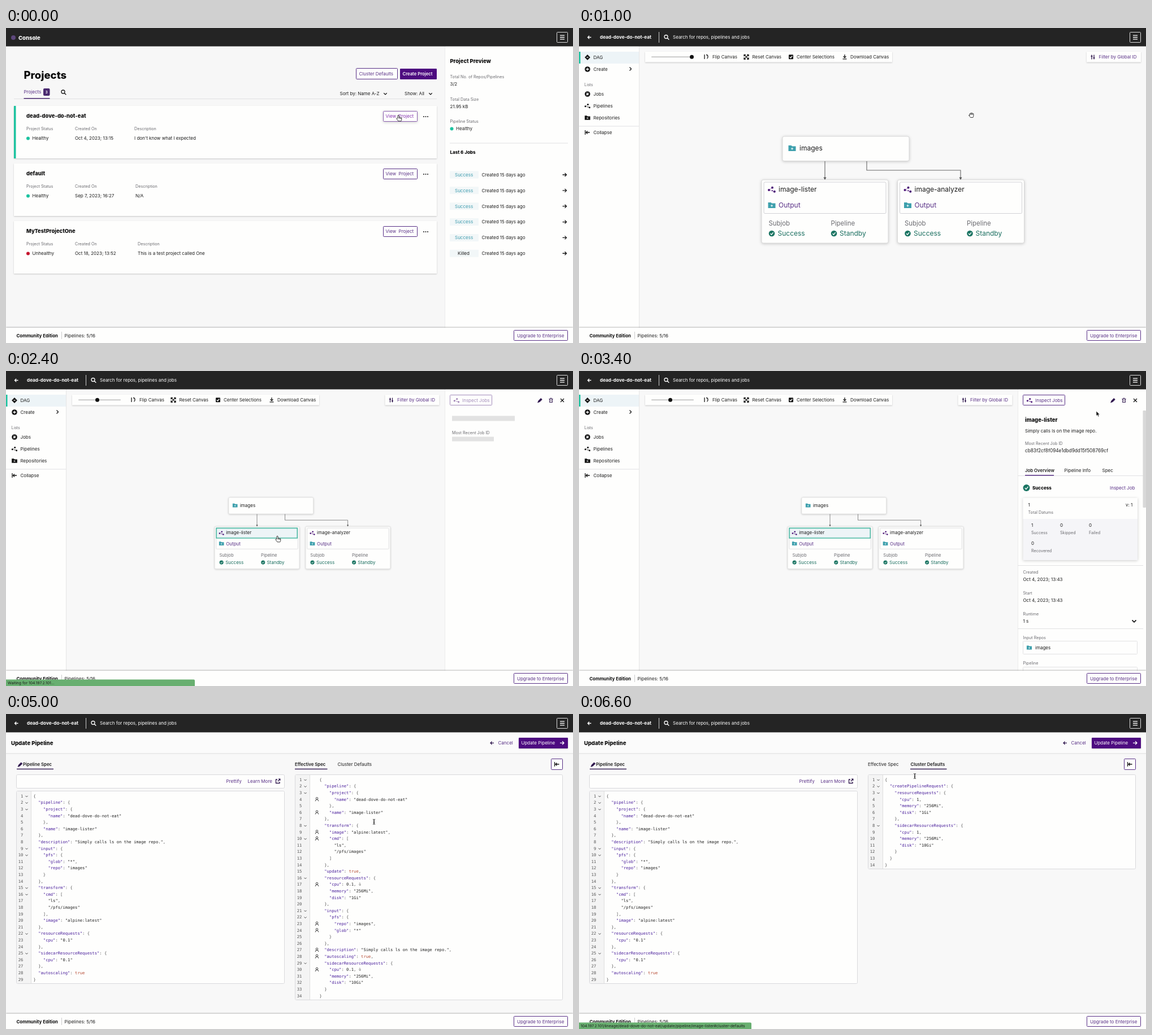
An HTML page for the animation above (6800 ms loop, 1003 by 558 pixels).

```html
<!DOCTYPE html>
<html lang="en">
<head>
<meta charset="utf-8">
<title>Console</title>
<style>
html, body { margin: 0; width: 100%; height: 100%; overflow: hidden; background: #f7f7f7; }
svg { display: block; width: 100vw; height: 100vh; }
text { font-family: Inter, "Open Sans", sans-serif; fill: #1d1d1d; white-space: pre; }
.head { font-weight: 800; fill: #0c0c0c; }
.bold { font-weight: 700; fill: #0c0c0c; }
.semi { font-weight: 600; }
.label { fill: #6b6b70; }
.purple { fill: #582f86; }
.violet { fill: #8433b0; }
.white { fill: #fff; }
.green { fill: #1b6f60; }
.teal { fill: #3f9cae; }
.code { font-family: "DejaVu Sans Mono", monospace; fill: #555; }
.code .key { fill: #4a1f9c; }
.code .str { fill: #222; }
.code .bool { fill: #b54a32; }
.code .old { text-decoration: line-through; fill: #888; }
.line { fill: none; stroke: #151515; stroke-width: 1.3; }
.shadow { filter: drop-shadow(0 1px 1px #0003); }
.raised { filter: drop-shadow(0 1px 2.5px #0003); }
</style>
</head>
<body>
<script>
const LOOP = 6800;
const PURPLE = '#582f86', GREEN = '#1cc3a0', PAPER = '#fefefd', RULE = '#e1e1e3';
let rules = '', count = 0;

// Timing: every track holds its value until the next key.
const at = ms => Math.max(0, (ms - 1) / LOOP * 100).toFixed(3) + '%';
function track(keys, body) {
  const name = 'track' + count++;
  rules += `@keyframes ${name}{${keys.map(([ms, css]) => `${at(ms)}{${css}}`).join('')}}
    .${name}{animation:${name} ${LOOP}ms step-end infinite}`;
  return `<g class="${name}">${body}</g>`;
}
function during(spans, body) {
  const keys = [[0, 'opacity:0']];
  for (const [from, to] of spans) {
    keys.push([from, 'opacity:1']);
    if (to < LOOP) keys.push([to, 'opacity:0']);
  }
  return track(keys, body);
}

// Drawing: text is placed by the middle of its capitals.
const text = (x, y, s, cls = '', size = 8) =>
  `<text x="${x}" y="${(y + size * .36).toFixed(2)}" font-size="${size}" class="${cls}">${s}</text>`;
const label = (x, y, s) => text(x, y, s, 'label', 7.2);
const rect = (x, y, w, h, fill, more = '') =>
  `<rect x="${x}" y="${y}" width="${w}" height="${h}" fill="${fill}" ${more}/>`;
// Outlined box: whole-pixel outer bounds keep the border crisp.
const box = (x, y, w, h, color = RULE, fill = PAPER, rx = 1, more = '') =>
  rect(x + .5, y + .5, w - 1, h - 1, fill, `stroke="${color}" rx="${rx}" ${more}`);
const dot = (x, y, r, fill) => `<circle cx="${x}" cy="${y}" r="${r}" fill="${fill}"/>`;
const icon = (x, y, d, color = '#151515', more = '') =>
  `<path transform="translate(${x} ${y})" d="${d}" class="line" style="stroke:${color};${more}"/>`;
const hline = (x, y, w, color = RULE, h = 1) => rect(x, y, w, h, color);

const RIGHT = 'M-3.5 0h7M.5-3l3 3-3 3', LEFT = 'M3 0h-6M-.3-2.7l-2.7 2.7 2.7 2.7';
const DOWN = 'M-2.7-1.3l2.7 2.7 2.7-2.7', CROSS = 'M-3-3l6 6M3-3l-6 6';
const TOLEFT = 'M-4-4v8M4 0h-6M0-2.5l-2.5 2.5 2.5 2.5';
const search = (x, y, c) => icon(x, y, 'M2-1a3 3 0 1 0-6 0a3 3 0 1 0 6 0M1.3 1.3l3 3', c);
const pencil = (x, y) => icon(x, y, 'M-3.3 3.3l1-2.5 4-4 1.6 1.6-4 4z', '#31194f', 'fill:#31194f');
const check = (x, y, r) => dot(x, y, r, '#1b7563') +
  icon(x, y, `M${-r * .45} 0l${r * .35} ${r * .4} ${r * .6} ${-r * .75}`, '#fff');
const folder = (x, y, s = 1, c = '#3ea0ad') => `<g transform="translate(${x} ${y}) scale(${s})">
  <path d="M-6.5-5h5l1.5 1.5h6.5v8.5h-13z" fill="${c}"/><path d="M-2 .8h4M0-1.2v4" stroke="#fff"/></g>`;
const nodes = (x, y, s = 1, c = '#4b1477') => `<g transform="translate(${x} ${y}) scale(${s})">
  <path d="M-5 1L1-3M-5 1L5 4" stroke="${c}" stroke-width=".8" opacity=".6"/>
  ${dot(-5, 1, 2, c)}${dot(1, -3.3, 2, c)}${dot(4.8, 3.8, 2, c)}${dot(1, 2, 1, c)}</g>`;

function header() {
  return rect(0, 0, 1003, 32.5, '#242424') + box(974, 7, 20, 19, '#ddd', 'none') +
    icon(984, 16.5, 'M-4-3.3h8M-4 0h8M-4 3.3h8', '#fff') +
    during([[0, 400]], dot(13, 17, 4, '#5d477c') + text(22, 17.5, 'Console', 'head white', 9.5)) +
    during([[400, LOOP]], icon(18.5, 16.5, LEFT, '#fff') +
      text(37, 16.5, 'dead-dove-do-not-eat', 'bold white', 8.2) + rect(141, 7, 1, 19, '#ccc') +
      search(155, 16.5, '#fff') + text(166, 16.5, 'Search for repos, pipelines and jobs', 'white'));
}

function footer() {
  return rect(0, 531, 1003, 28, PAPER, 'style="filter:drop-shadow(0 -1px 1px #0004)"') +
    text(18.5, 545, 'Community Edition', 'bold', 7.9) + rect(98, 538, 1, 13, '#ccc') +
    text(103.5, 545, 'Pipelines: 5/16') + box(898, 535, 96, 19, PURPLE) +
    text(904, 545, 'Upgrade to Enterprise', 'purple');
}

const viewButton = (y, hovered) =>
  box(667, y, 61, 19, hovered ? '#8a5fae' : PURPLE, PAPER, 1, hovered ? 'class="raised"' : '') +
  text(671.5, y + 9.5, 'View  Project', hovered ? 'violet' : 'purple');

function project(y, name, health, color, created, descX, descText, hovered = false) {
  return rect(14, y, 748, 93, PAPER, 'class="shadow"') + text(36, y + 18, name, 'head', 9.4) +
    label(36, y + 40, 'Project Status') + dot(39, y + 57.5, 3, color) + text(46.5, y + 57.5, health) +
    label(122, y + 40, 'Created On') + text(122, y + 57.5, created) +
    label(descX, y + 40, 'Description') + text(descX, y + 57.5, descText) + viewButton(y + 9, hovered) +
    [739, 742.5, 746].map(x => dot(x, y + 19, 1, '#151515')).join('');
}

function projectsPage() {
  const jobs = [0, 1, 2, 3, 4, 5].map(i => {
    const y = 260 + i * 27.85, killed = i == 5;
    return rect(785, y - 6.5, 51, 13, '#f2f7f8', 'rx="1"') +
      text(killed ? 799 : 794, y, killed ? 'Killed' : 'Success', killed ? '' : 'teal') +
      text(841.5, y, 'Created 15 days ago') + icon(988, y, RIGHT);
  }).join('');
  return rect(0, 32, 1003, 500, '#f7f7f7') + text(31.5, 83.2, 'Projects', 'head', 18.5) +
    box(619, 71, 74, 20, PURPLE) + text(624.5, 81.5, 'Cluster Defaults', 'purple') +
    rect(697, 72, 65, 19, '#4d0b80', 'rx="1"') + text(701.5, 81.5, 'Create Project', 'white semi', 7.7) +
    text(31.5, 113.5, 'Projects', 'purple') + rect(66, 107, 11.5, 13, '#4a2a70', 'rx="2"') +
    text(69.8, 113.7, '3', 'white bold', 6) + search(102, 114, '#151515') +
    text(590.5, 116, 'Sort by: Name A-Z') + icon(671, 116.5, DOWN) +
    text(705, 116, 'Show: All') + icon(751, 116.5, DOWN) +
    hline(14, 125, 748) + hline(31.5, 124, 46, '#4a2a70', 1.5) +
    project(138, 'dead-dove-do-not-eat', 'Healthy', GREEN, 'Oct 4, 2023; 13:15', 227, "I don't know what I expected", true) +
    rect(14, 138, 3.5, 93, GREEN) +
    project(240, 'default', 'Healthy', GREEN, 'Sep 7, 2023; 16:27', 229, 'N/A') +
    project(342, 'MyTestProjectOne', 'Unhealthy', '#c5162e', 'Oct 18, 2023; 13:52', 233, 'This is a test project called One') +
    rect(776, 32, 227, 499, PAPER) + rect(776, 32, 1, 499, '#ececec') +
    text(785.5, 58.5, 'Project Preview', 'head', 9.4) +
    label(785.5, 86.5, 'Total No. of Repos/Pipelines') + text(785.5, 99.5, '3/2') +
    label(785.5, 126, 'Total Data Size') + text(785.5, 139, '21.95 kB') +
    label(785.5, 165, 'Pipeline Status') + dot(788.5, 178.5, 3, GREEN) + text(796, 178.5, 'Healthy') +
    hline(785, 203.5, 209) + text(785.5, 220.5, 'Last 6 Jobs', 'head', 8) + jobs;
}

function pipelineNode(x, name, highlight = '') {
  return rect(x, 269, 224, 112, PAPER, 'rx="3" stroke="#dadada" class="raised"') +
    box(x + 3.5, 272.5, 217, 56.5, '#d2d2d6', PAPER, 2) + highlight +
    nodes(x + 18, 286) + text(x + 30, 285.5, name, '', 12) +
    folder(x + 18, 314) + text(x + 30, 314, 'Output', 'purple', 12) +
    text(x + 12.5, 345.5, 'Subjob', 'label', 11.4) + text(x + 122.5, 345.5, 'Pipeline', 'label', 11.4) +
    check(x + 18, 364, 5.3) + text(x + 28.5, 364, 'Success', 'green', 12) +
    check(x + 128, 364, 5.3) + text(x + 138, 364, 'Standby', 'green', 12);
}

function graph() {
  const selected = during([[2200, 3800]],
    rect(327.5, 273, 214, 26.5, '#edf4f7', 'stroke="#2bae94" stroke-width="2"'));
  const head = x => `<path d="M${x - 2.5} 264.5h5l-2.5 4.5z" fill="#555"/>`;
  return track([
    [0, 'transform:none'],
    [2200, 'transform:translate(76px,48px) scale(.835)'],
    [2400, 'transform:translate(153px,95.6px) scale(.669)']
  ], rect(360, 192, 224, 43.5, PAPER, 'rx="3" stroke="#dadada" class="raised"') +
    folder(377, 213) + text(390, 212.5, 'images', '', 12) +
    pipelineNode(323, 'image-lister', selected) + pipelineNode(563.5, 'image-analyzer') +
    '<path d="M435 236v30M509 236v16h166v14" fill="none" stroke="#666" stroke-width="1.1"/>' +
    head(435) + head(675));
}

function sidebar() {
  const black = '#151515';
  return rect(0, 32, 106.5, 499, PAPER) + rect(106, 32, 1, 499, '#e6e6e6') +
    rect(0, 42, 106, 21, '#edf4f7') + rect(0, 42, 2.5, 21, GREEN) +
    icon(15, 52, 'M0-4l4 4-4 4-4-4z', black, 'fill:#151515') + icon(15, 52, 'M-1.5 0h3', '#fff') +
    text(25.5, 52, 'DAG') +
    dot(15, 73, 4.8, black) + icon(15, 73, 'M-2.6 0h5.2M0-2.6v5.2', '#fff') +
    text(25.5, 73, 'Create') + icon(91, 72.5, 'M-1.5-3l3 3-3 3') +
    text(9.5, 100, 'Lists', 'label', 7) +
    dot(15, 117, 4.8, black) + icon(15, 117, 'M-2 2l4-4M-1-2.5v3.5h3', '#fff') + text(25.5, 117, 'Jobs') +
    nodes(15, 138, .75, black) + text(25.5, 138, 'Pipelines') +
    folder(15, 159, .75, black) + text(25.5, 159, 'Repositories') +
    hline(0, 173.5, 106) + icon(15, 185, TOLEFT) + text(25.5, 185.5, 'Collapse');
}

function toolbar() {
  const knob = track([[0, 'transform:none'], [2200, 'transform:translateX(-19px)'], [2400, 'transform:translateX(-38px)']],
    dot(199.5, 51.3, 3.5, '#111'));
  const filter = track([[0, 'transform:none'], [2200, 'transform:translateX(-227.5px)']],
    rect(898, 42, 96, 18.5, PAPER, 'class="shadow"') +
    icon(909, 51.5, 'M-2-4v8M2-4v8M-3.5-1.5h3M.5 1.5h3', '#31194f') + text(919.5, 51.3, 'Filter by Global ID', 'purple'));
  return rect(117, 42, 437, 18.5, PAPER, 'class="shadow"') + rect(128, 50.3, 75, 2, '#c9c9c9', 'rx="1"') + knob +
    icon(225, 51, 'M-3-4v8M0-3.5q3 0 3 3.5t-3 3.5', '#151515', 'stroke-dasharray:9 2') + text(236, 51.3, 'Flip Canvas') +
    icon(296, 51.3, 'M-4-1v-3h3M1-4h3v3M4 1v3h-3M-1 4h-3v-3M-4-4l8 8M4-4l-8 8') + text(306.5, 51.3, 'Reset Canvas') +
    rect(371, 47.3, 8, 8, '#151515', 'rx="1"') + icon(375, 51.3, 'M-2.3 0l1.7 1.7 3-3.5', '#fff') + text(385, 51.3, 'Center Selections') +
    icon(470, 51, 'M0-4v5.5M-2.4-.8l2.4 2.4 2.4-2.4M-3.5 3.8h7') + text(480, 51.3, 'Download Canvas') + filter;
}

function panel() {
  const stat = (x, y, n, name) => text(x, y, n) + label(x, y + 13, name);
  const inspect = box(785, 42, 75, 19, PURPLE) + nodes(797, 52, .75) + text(807, 52, 'Inspect Jobs', 'purple');
  const loading = `<g opacity=".55">${inspect}</g>` + rect(789, 79.5, 111, 9, '#e2e2e2') + rect(789, 116.5, 74, 8, '#e2e2e2') +
    label(789, 109, 'Most Recent Job ID');
  const loaded = inspect + text(789, 87, 'image-lister', 'head', 9.5) +
    text(789, 106, 'Simply calls ls on the image repo.') + label(789, 128, 'Most Recent Job ID') +
    text(789, 141.5, 'cb83f2cf8f094e1dbd9dd15f508769cf', '', 8.25) +
    text(789, 176, 'Job Overview', 'semi', 7.8) + text(858.5, 176, 'Pipeline Info') + text(925.5, 176, 'Spec') +
    hline(776, 185, 222) + hline(789, 184, 51, PURPLE, 1.5) +
    check(791.5, 207, 6) + text(802, 207, 'Success', 'head', 8) + text(939, 207, 'Inspect Job', 'purple') +
    rect(785.5, 225, 202.5, 110, '#f5f5f8', 'class="raised"') + rect(785.5, 225, 202.5, 37, PAPER) +
    stat(794.5, 237, '1', 'Total Datums') + text(967, 237, 'v: 1') +
    stat(800, 273, '1', 'Success') + stat(851, 273, '0', 'Skipped') + stat(902, 273, '0', 'Failed') +
    stat(800, 305.5, '0', 'Recovered') + hline(776, 344, 222) +
    label(785.5, 356, 'Created') + text(785.5, 369.5, 'Oct 4, 2023; 13:43') +
    label(785.5, 393.5, 'Start') + text(785.5, 406.5, 'Oct 4, 2023; 13:43') +
    label(785.5, 430.5, 'Runtime') + text(785.5, 443.5, '1 s') +
    icon(982, 443, 'M-3.5-1.7l3.5 3.5 3.5-3.5', '#151515', 'stroke-width:1.8') +
    hline(776, 456, 222) + label(785.5, 472, 'Input Repos') + box(785, 478, 203, 24) +
    folder(796.5, 490, .7) + text(807, 490, 'images') + label(785.5, 517.5, 'Pipeline') + box(785, 524, 203, 23) +
    rect(997.5, 70, 5.5, 172, '#d8d8d8', 'rx="1"');
  return rect(776, 32, 227, 499, PAPER) + rect(776, 32, 1, 499, '#ececec') +
    pencil(944.5, 52) + icon(964, 52, 'M-3.5-2.5h7M-1.2-4h2.4M-2.5-2.5v6h5v-6M0-1v3', '#31194f', 'stroke-width:1') + icon(984, 52, CROSS) +
    during([[2200, 2600]], loading) + during([[2600, 3800]], loaded);
}

// Editor: gutter, fold marks and coloured JSON.
const STEP = 11.6, EDGE = '#d9d9dc';
function editor(x, y, w, codeX, data, { authored = [], replaced = [] } = {}) {
  const lines = JSON.stringify(data, null, 2).split('\n');
  const paint = s => s.replace(/("[^"]*")(:?)|\b(true)\b|([\d.]+)/g, (m, str, colon, bool) =>
    bool ? `<tspan class="bool">${m}</tspan>`
      : colon ? `<tspan class="key">${str}</tspan>:` : `<tspan class="str">${m}</tspan>`);
  const h = Math.round(lines.length * STEP + 6);
  return box(x, y, w, h, EDGE, PAPER, 2) + rect(x + 1, y + 1, 26, h - 2, '#f4f4f4') + rect(x + 26, y + 1, 1, h - 2, '#dedede') +
    lines.map((s, i) => {
      const n = i + 1, cy = y + 9.2 + i * STEP;
      const old = replaced.includes(n) ? ' <tspan class="old">1</tspan>' : '';
      return text(x + (n < 10 ? 8 : 3.7), cy, n, 'code', 7.2) + text(codeX, cy, paint(s) + old, 'code', 7.2) +
        (/[{[]$/.test(s) ? icon(x + 18.5, cy + .7, 'M-2-1l2 2 2-2', '#444', 'stroke-width:1') : '') +
        (authored.includes(n) ? icon(x + 39, cy, 'M-2.8 3.5q0-3 2.8-3t2.8 3M1.8-1.5a1.8 1.8 0 1 0-3.6 0a1.8 1.8 0 1 0 3.6 0', '#333', 'stroke-width:.9') : '');
    }).join('');
}

const about = 'Simply calls ls on the image repo.';
const pipeline = { project: { name: 'dead-dove-do-not-eat' }, name: 'image-lister' };
const cmd = ['ls', '/pfs/images'];
const limits = (cpu, disk) => ({ cpu, memory: '256Mi', disk });
const pipelineSpec = {
  pipeline,
  description: about,
  input: { pfs: { glob: '*', repo: 'images' } },
  transform: { cmd, image: 'alpine:latest' },
  resourceRequests: { cpu: '0.1' },
  sidecarResourceRequests: { cpu: '0.1' },
  autoscaling: true
};
const effectiveSpec = {
  pipeline,
  transform: { image: 'alpine:latest', cmd },
  update: true,
  resourceRequests: limits(0.1, '1Gi'),
  input: { pfs: { repo: 'images', glob: '*' } },
  description: about,
  autoscaling: true,
  sidecarResourceRequests: limits(0.1, '10Gi')
};
const clusterDefaults = {
  createPipelineRequest: { resourceRequests: limits(1, '1Gi'), sidecarResourceRequests: limits(1, '10Gi') }
};

function updatePage() {
  const tabs = first => text(511, 89, 'Effective Spec', first ? 'semi' : '', first ? 7.8 : 8) +
    text(586.5, 89, 'Cluster Defaults', first ? '' : 'semi', first ? 8 : 7.8) +
    hline(first ? 511 : 586, 96.8, first ? 57.5 : 64.5, '#31194f', 1.4);
  const button = fill => rect(907, 42, 87, 19, fill, 'rx="1" class="shadow"');
  return rect(0, 32, 1003, 499, '#f8f8f8') + rect(0, 32, 1003, 37.5, '#fbfbfb') + hline(0, 69.5, 1003, '#dedede') +
    text(9, 51.3, 'Update Pipeline', 'head', 9.6) +
    icon(860, 51.3, LEFT, '#31194f') + text(870.5, 51.3, 'Cancel', 'purple') +
    button('#4d0b80') + during([[3800, 4400]], button('#8c12c1')) +
    text(911.5, 51.3, 'Update Pipeline', 'white') + icon(983.5, 51.3, RIGHT, '#fff') +
    pencil(25, 89.5) + text(30, 89, 'Pipeline Spec', 'semi', 7.8) + hline(19, 96.8, 65, '#31194f', 1.4) +
    box(964, 79, 21, 20, PURPLE) + icon(974.5, 89, TOLEFT) +
    box(18, 107, 475, 25, EDGE, PAPER, 2) + text(389.5, 119.5, 'Prettify', 'purple') + text(427.5, 119.5, 'Learn More', 'purple') +
    icon(481, 119, 'M-1-3h-2.5v6.5h6.5v-2.5M1-3.8h2.8v2.8M3.8-3.8l-4 4', '#31194f') +
    during([[3800, 6200]], tabs(true)) + during([[6200, LOOP]], tabs(false)) +
    during([[3800, 4400]], box(18, 136, 475, 95, EDGE, PAPER, 2) +
      [238, 255.5, 273].map(x => dot(x, 183.5, 3, '#d3d3d3')).join('') +
      box(511, 107, 474, 18, EDGE, PAPER, 2) + rect(512, 108, 24, 16, '#f4f4f4') +
      rect(535, 108, 1, 16, '#dedede') + text(517, 116, '1', 'code', 7.2)) +
    during([[4400, LOOP]], editor(18, 136, 475, 48.5, pipelineSpec)) +
    during([[4400, 6200]], editor(511, 107, 474, 554.5, effectiveSpec,
      { authored: [4, 6, 9, 10, 17, 23, 24, 27, 28, 30], replaced: [17, 30] })) +
    during([[6200, LOOP]], editor(511, 107, 474, 541, clusterDefaults));
}

function statusBar() {
  const bar = (w, s) => rect(-2, 546.5, w + 2, 14, '#68af70', 'rx="2"') + text(3, 553, s, '', 6.85);
  return during([[200, 600], [2200, 2600], [3800, 4400]], bar(334, 'Waiting for 104.197.2.101...')) +
    during([[5600, LOOP]], bar(305, '104.197.2.101/lineage/dead-dove-do-not-eat/update/pipeline/image-lister#cluster-defaults'));
}

// Pointer: stops are [ms, x, y]; it advances once every 200 ms.
function pointer() {
  const stops = [[0, 694, 154], [1200, 694, 154], [2000, 480, 292], [2600, 480, 292], [3400, 915, 71], [3600, 944, 52],
    [4200, 944, 52], [5000, 651, 191], [5600, 630, 88], [6400, 630, 88], [6600, 594, 110], [LOOP, 594, 110]];
  const keys = [];
  for (let ms = 0; ms < LOOP; ms += 200) {
    const i = stops.findIndex(s => s[0] > ms);
    const [a, b] = [stops[i - 1], stops[i]];
    const p = (ms - a[0]) / (b[0] - a[0]), ease = p * p * (3 - 2 * p);
    const [x, y] = [1, 2].map(k => (a[k] + (b[k] - a[k]) * ease).toFixed(1));
    keys.push([ms, `transform:translate(${x}px,${y}px)`]);
  }
  const shape = d => `<path d="${d}" fill="#fff" stroke="#111" stroke-width=".8" stroke-linejoin="round"/>`;
  const hand = shape('M-1.1 6v-5q1.1-2 2.2 0v3.4q1-.8 1.7.2 1-.6 1.6.3 1.4-.4 1.4 1v2q0 1.5-1 3h-4.8l-3.2-4.2q0-1.8 2.1-.7zM1.1 4.4v2M2.8 4.8v1.8M4.4 5.1v1.7');
  const grab = shape('M-2.8 1v-3.2q.9-1.4 1.8-.4.2-1.6 1.6-.6 1.2-.8 1.7.6 1.6-.3 1.6 1.2v2.4q0 1.6-1 3.5h-4.4l-3-3.8q0-1.4 1.7.3zM-1-2.6v2.4M.6-3.2v3M2.3-2.6v2.4');
  const arrow = '<path d="M0 0v8.6l2-1.8 1.5 3.2 1.5-.7-1.5-3h2.7z" fill="#111" stroke="#fff" stroke-width=".6"/>';
  const beam = '<path d="M-2-4.5q2 0 2 1.2v6.6q0 1.2-2 1.2M2-4.5q-2 0-2 1.2v6.6q0 1.2 2 1.2M-1 1.2h2" fill="none" stroke="#222" stroke-width=".9"/>';
  return track(keys,
    during([[0, 400], [1800, 2800], [3600, 4400], [5600, 6600]], hand) + during([[400, 1800], [2800, 3200]], grab) +
    during([[3200, 3600], [4400, 4800]], arrow) + during([[4800, 5600], [6600, LOOP]], beam));
}

const scene = during([[0, 400]], projectsPage()) +
  during([[400, 3800]], rect(0, 32, 1003, 499, '#f8f8f8') + graph() + sidebar() + toolbar() + during([[2200, 3800]], panel())) +
  during([[3800, LOOP]], updatePage()) + header() + footer() + statusBar() + pointer();
document.head.insertAdjacentHTML('beforeend', `<style>${rules}</style>`);
document.body.innerHTML = `<svg viewBox="0 0 1003 558" preserveAspectRatio="none">${scene}</svg>`;
</script>
</body>
</html>
```
